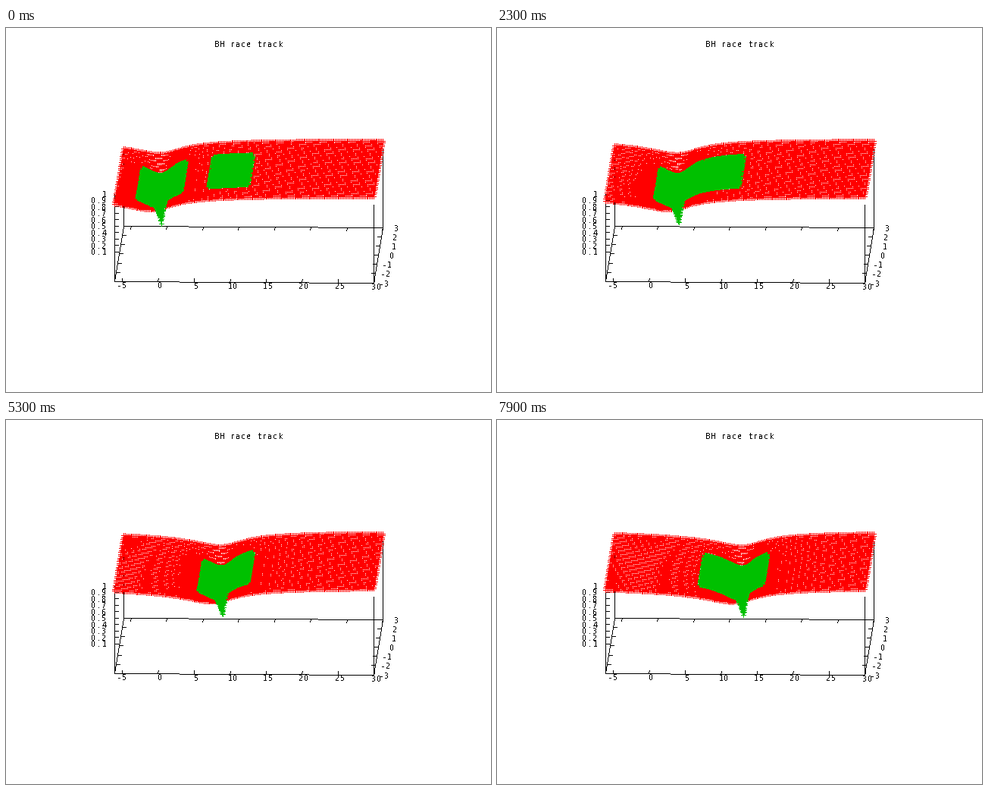
Write a matplotlib script that moves like this. It is 640 px wide and 480 px high and loops after 8 s.

```python
import numpy as np
import matplotlib.pyplot as plt
from matplotlib.animation import FuncAnimation

W, H = 640, 480
FRAMES, STEP_MS = 80, 100
X0, X1, Y0, Y1 = -6, 30, -3, 3
BLACK, RED, GREEN = (0, 0, 0), (255, 0, 0), (0, 192, 0)
ARM = 3
FLOOR = -0.355
CELL = 7


def project(x, y, z):
    """Oblique view of the track, in pixels from the top left."""
    u, v = x - X0, y - Y0
    return 143.5 + 9.5 * u + 2 * v, 304 + 0.05 * u - 12.1 * v - 85.3 * z


def slowdown(x, y, hole):
    """Clock rate near the moving hole, lower in its wake."""
    d = x - hole
    r = np.hypot(d, y)
    return 1 - 0.93 * (1 - 0.36 * d / (r + 0.8)) / (r + 1.05)


def grid(xa, xb, ya, yb, step):
    xs = np.linspace(xa, xb, round((xb - xa) / step) + 1)
    ys = np.linspace(ya, yb, round((yb - ya) / step) + 1)
    return [a.ravel() for a in np.meshgrid(xs, ys)]


def draw_crosses(img, x, y, hole, color):
    z = slowdown(x, y, hole)
    keep = z >= 0.1
    px, py = project(x[keep], y[keep], z[keep])
    px, py = px.astype(int), py.astype(int)
    for d in range(-ARM, ARM + 1):
        img[py, px + d] = color
        img[py + d, px] = color


def draw_line(img, a, b):
    (xa, ya), (xb, yb) = np.floor(a), np.floor(b)
    n = int(max(abs(xb - xa), abs(yb - ya))) + 1
    xs, ys = np.linspace(xa, xb, n), np.linspace(ya, yb, n)
    img[np.rint(ys).astype(int), np.rint(xs).astype(int)] = BLACK


def draw_tick(img, x, y, z, dx, dy):
    px, py = project(x, y, z)
    draw_line(img, (px, py), (px + dx, py + dy))


def label(x, y, text, align=0.0):
    """Terminal-style text: one character per cell, x anchored by align."""
    left = round(x - align * CELL * len(text))
    for i, char in enumerate(text):
        ax.text(left + CELL * (i + 0.5), round(y) + 4, char, ha="center",
                va="baseline", family="DejaVu Sans", size=6.9,
                color="black", antialiased=False)


track = grid(X0, X1, Y0, Y1, 0.2)
patch = grid(6.8, 12.2, -1.6, 1.6, 0.1)
around = grid(-3, 3, -1.6, 1.6, 0.1)

fig = plt.figure(figsize=(W / 100, H / 100), dpi=100, facecolor="white")
ax = fig.add_axes([0, 0, 1, 1])
ax.set(xlim=(0, W), ylim=(H, 0))
ax.axis("off")

back = np.full((H, W, 3), 255, np.uint8)
corners = [(X0, Y0), (X1, Y0), (X1, Y1), (X0, Y1)]
base = [project(x, y, FLOOR) for x, y in corners]
for i, (x, y) in enumerate(corners):
    draw_line(back, base[i], base[(i + 1) % 4])
    draw_line(back, base[i], project(x, y, 1 if i == 0 else 0.85))

for x in range(-5, 31, 5):
    draw_tick(back, x, Y0, FLOOR, 0.7, -4)
    draw_tick(back, x, Y1, FLOOR, -0.7, 4)
    px, _ = project(x, Y0, FLOOR)
    label(px + (3 if x >= 0 else -0.5), 339 + 0.05 * (x + 5), str(x), 0.5)
for y in range(Y0, Y1 + 1):
    draw_tick(back, X0, y, FLOOR, 5, 0)
    draw_tick(back, X1, y, FLOOR, -5, 0)
    px, py = project(X1, y, FLOOR)
    label(px + (14 if y >= 0 else 7), py + 0.5, str(y))
for k in range(1, 11):
    draw_tick(back, X0, Y0, k / 10, 5, 0)
    label(133, project(X0, Y0, k / 10)[1], f"{k / 10:g}", 1)
label(320.5, 21, "BH race track", 0.5)

surface = ax.imshow(back, extent=(0, W, H, 0), aspect="auto",
                    interpolation="nearest")


def update(i):
    hole = -0.1 + 0.16 * i
    img = back.copy()
    draw_crosses(img, *track, hole, RED)
    draw_crosses(img, *patch, hole, GREEN)
    draw_crosses(img, around[0] + round(hole, 1), around[1], hole, GREEN)
    surface.set_data(img)
    return [surface]


anim = FuncAnimation(fig, update, frames=FRAMES, interval=STEP_MS,
                     repeat=True, repeat_delay=0, blit=False)
plt.show()
```
